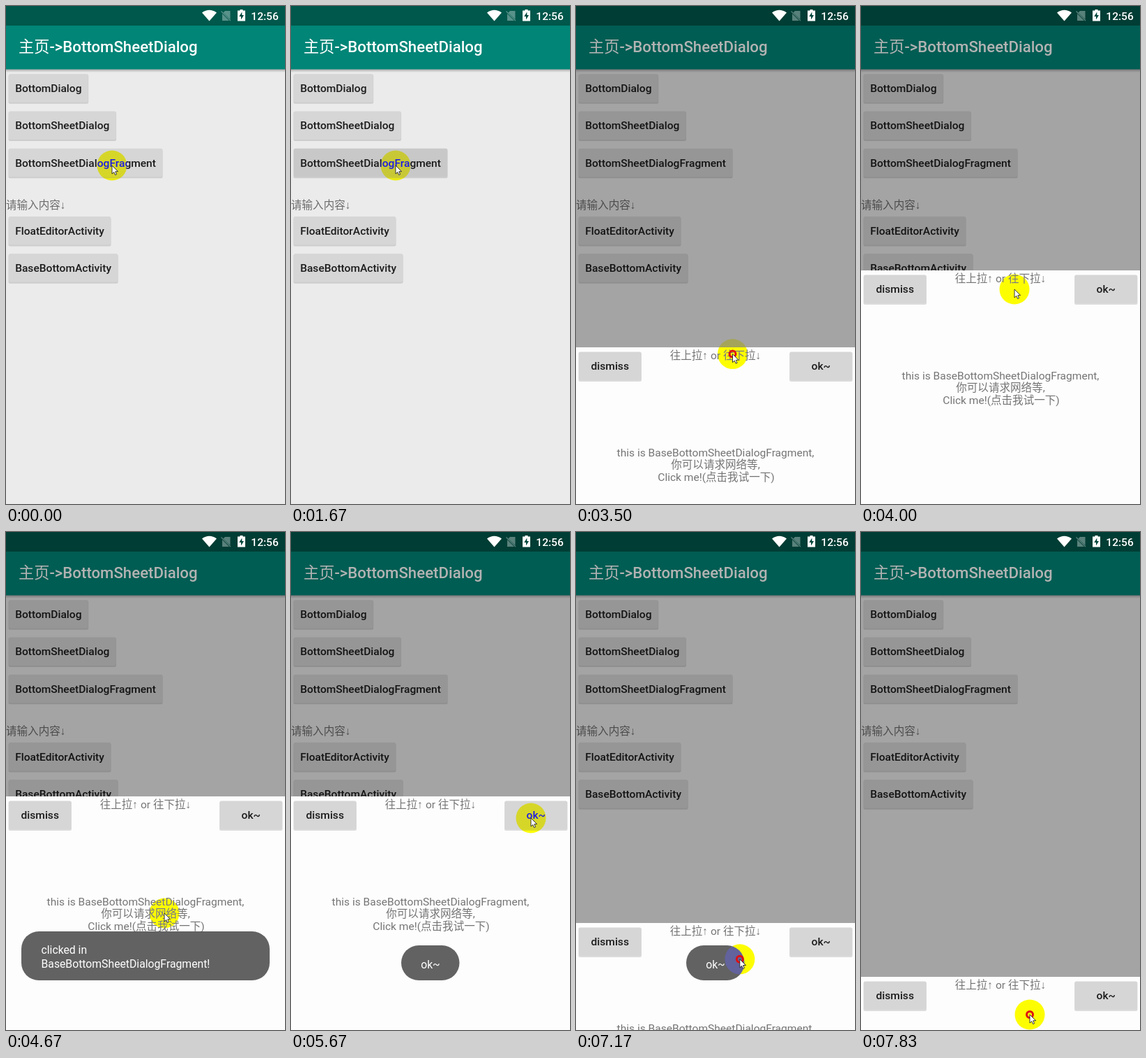
Recreate the animation shown at these times as an HTML page. Size 400 by 712 pixels, loop 8 s.

```html
<!DOCTYPE html>
<html lang="zh-CN">
<head>
<meta charset="utf-8">
<title>Bottom sheet</title>
<style>
  html, body { margin: 0; width: 100%; height: 100%; overflow: hidden; background: #ebebeb; }
  svg { display: block; width: 400px; height: 712px; isolation: isolate; }
  text { font: 15.56px Roboto, "Liberation Sans", "Noto Sans CJK SC", "Noto Sans CJK", sans-serif; fill: rgb(0, 0, 0, .54); }
  .button text, .clock { font-weight: 500; fill: #1b1b1b; }
  .button .face { fill: #d6d6d6; }
  .button .shade { fill: #000; opacity: .13; }
  .button.pressed .face { fill: #c8c8c8; }
  .title { font-size: 22.22px; font-weight: 500; fill: #fff; }
  .title tspan { font-weight: 400; }
  .clock { fill: #fff; }
  .toast text { fill: #fff; font-size: 15.75px; }
  .toast rect { fill: rgb(50, 50, 50); fill-opacity: .76; }
  .mid { text-anchor: middle; }
  #halo { fill: #00f; mix-blend-mode: difference; }
</style>
</head>
<body>
<svg viewBox="0 0 400 712">
  <defs>
    <linearGradient id="fade" x2="0" y2="1">
      <stop stop-color="#000" stop-opacity=".3"/>
      <stop offset="1" stop-color="#000" stop-opacity="0"/>
    </linearGradient>
  </defs>
  <rect width="400" height="712" fill="#ebebeb"/>
  <rect y="90" width="400" height="5" fill="url(#fade)"/>
  <rect y="27" width="400" height="63.5" fill="#008577"/>
  <rect width="400" height="28" fill="#00574b"/>
  <text class="title" x="18" y="65.7"><tspan>主页</tspan>-&gt;BottomSheetDialog</text>
  <g id="menu"></g>
  <text x="0" y="289.7">请输入内容↓</text>
  <rect id="dim" width="400" height="712" opacity=".3"/>

  <g fill="#fff">
    <path d="M291.500 21.500L281 9.500Q291.500 2 302 9.500Z"/>
    <g opacity=".35">
      <path d="M314 7h7.500v12L311.500 9.500ZM310 11l10 10h-10Z"/>
      <path d="M308.500 7.500L322 21" stroke="#fff" stroke-width="1.300"/>
    </g>
    <path d="M335.500 6.500v-1.500h4v1.500h3.500v15h-11v-15Z"/>
    <path d="M338.300 8.500l-4 6.500h2.700v4.500l4-6.500h-2.700Z" fill="#00463c"/>
    <text class="clock" x="351.300" y="20">12:56</text>
  </g>

  <g id="sheet">
    <rect width="400" height="400" fill="#fdfdfd"/>
    <g class="mid">
      <text x="200" y="17">往上拉↑ or 往下拉↓</text>
      <text x="200" y="156">this is BaseBottomSheetDialogFragment,</text>
      <text x="200" y="173">你可以请求网络等,</text>
      <text x="201" y="191">Click me!(点击我试一下)</text>
    </g>
  </g>

  <g id="messageToast" class="toast">
    <rect x="22" y="571" width="356" height="70" rx="25"/>
    <text x="50.500" y="602.500">clicked in</text>
    <text x="50.500" y="623">BaseBottomSheetDialogFragment!</text>
  </g>
  <g id="okToast" class="toast">
    <rect x="158" y="591" width="83.500" height="50" rx="25"/>
    <text class="mid" x="200" y="623.500">ok~</text>
  </g>

  <circle id="halo" r="21.500"/>
  <g id="pointer">
    <circle id="ring" r="4.500" fill="none" stroke="#e01010" stroke-width="3"/>
    <path d="M0 0V12L2.800 9.500L4.600 13.500L6.600 12.700L4.800 8.700H8.600Z" fill="#fff" stroke="#222" stroke-width=".9"/>
  </g>
</svg>
<script>
  const LOOP = 8000, STEP = 1000 / 6;
  const ROW = 53.25, SECTION_GAP = 44.1;
  const $ = id => document.getElementById(id);

  // Without a fixed width the button wraps its label.
  function addButton(parent, label, x, y, fixedWidth) {
    parent.insertAdjacentHTML('beforeend', `<g class="button" transform="translate(${x} ${y})">
      <rect class="shade" x="-.5" y=".5" height="42" rx="2.5"/>
      <rect class="face" height="40.5" rx="2"/>
      <text class="mid" y="26">${label}</text></g>`);
    const button = parent.lastElementChild;
    const [shade, face, text] = button.children;
    const width = fixedWidth || text.getComputedTextLength() + 18.3;
    shade.setAttribute('width', width + 1);
    face.setAttribute('width', width);
    text.setAttribute('x', width / 2);
    return button;
  }

  const labels = ['BottomDialog', 'BottomSheetDialog', 'BottomSheetDialogFragment',
    'FloatEditorActivity', 'BaseBottomActivity'];
  const menuButtons = labels.map((label, i) =>
    addButton($('menu'), label, 4, 97.2 + ROW * i + (i > 2 ? SECTION_GAP : 0)));
  addButton($('sheet'), 'dismiss', 4, 6.4, 89.5);
  const okButton = addButton($('sheet'), 'ok~', 306.5, 6.4, 89.5);

  const smooth = p => p * p * (3 - 2 * p);
  const slowDown = p => Math.sin(p * Math.PI / 2);

  const pointerPath = {
    start: [152, 228],
    moves: [
      { from: 200, until: 300, to: [150, 228] },
      { from: 2270, until: 2660, to: [231, 632] },
      { from: 3000, until: 3890, to: [220, 405] },
      { from: 4000, until: 4400, to: [227, 545] },
      { from: 4680, until: 5330, to: [344, 409] },
      { from: 5720, until: 6330, to: [215, 391] },
      { from: 6428, until: 7833, to: [242, 690], ease: slowDown }
    ]
  };
  const sheetPath = {
    start: [600],
    moves: [
      { from: 3000, until: 3995, to: [378] },
      { from: 6513, until: 7833, to: [636], ease: slowDown }
    ]
  };

  function follow({ start, moves }, time) {
    return moves.reduce((place, { from, until, to, ease = smooth }) => {
      const part = ease(Math.min(1, Math.max(0, (time - from) / (until - from))));
      return place.map((value, i) => value + (to[i] - value) * part);
    }, start);
  }

  const show = (id, on) => $(id).setAttribute('visibility', on ? 'visible' : 'hidden');

  function render(elapsed) {
    const time = Math.floor((elapsed % LOOP + 4) / STEP) * STEP % LOOP;
    const during = (from, until) => time >= from && time < until;
    const [x, y] = follow(pointerPath, time);
    const [top] = follow(sheetPath, time);

    show('dim', time > 1800);
    show('sheet', time > 1800);
    $('sheet').setAttribute('transform', `translate(0 ${Math.round(top)})`);
    menuButtons[2].classList.toggle('pressed', during(1600, 1800));
    okButton.classList.toggle('pressed', during(5300, 5600));
    show('messageToast', during(4600, 5450));
    show('okToast', during(5450, 7600));
    show('ring', during(950, 1100) || during(2800, 3900) || during(4450, 4600) ||
      during(5300, 5450) || time > 6300);
    for (const id of ['halo', 'pointer']) $(id).setAttribute('transform', `translate(${x} ${y})`);
  }

  const begin = performance.now();
  function tick() {
    render(performance.now() - begin);
    requestAnimationFrame(tick);
  }
  tick();
</script>
</body>
</html>
```
